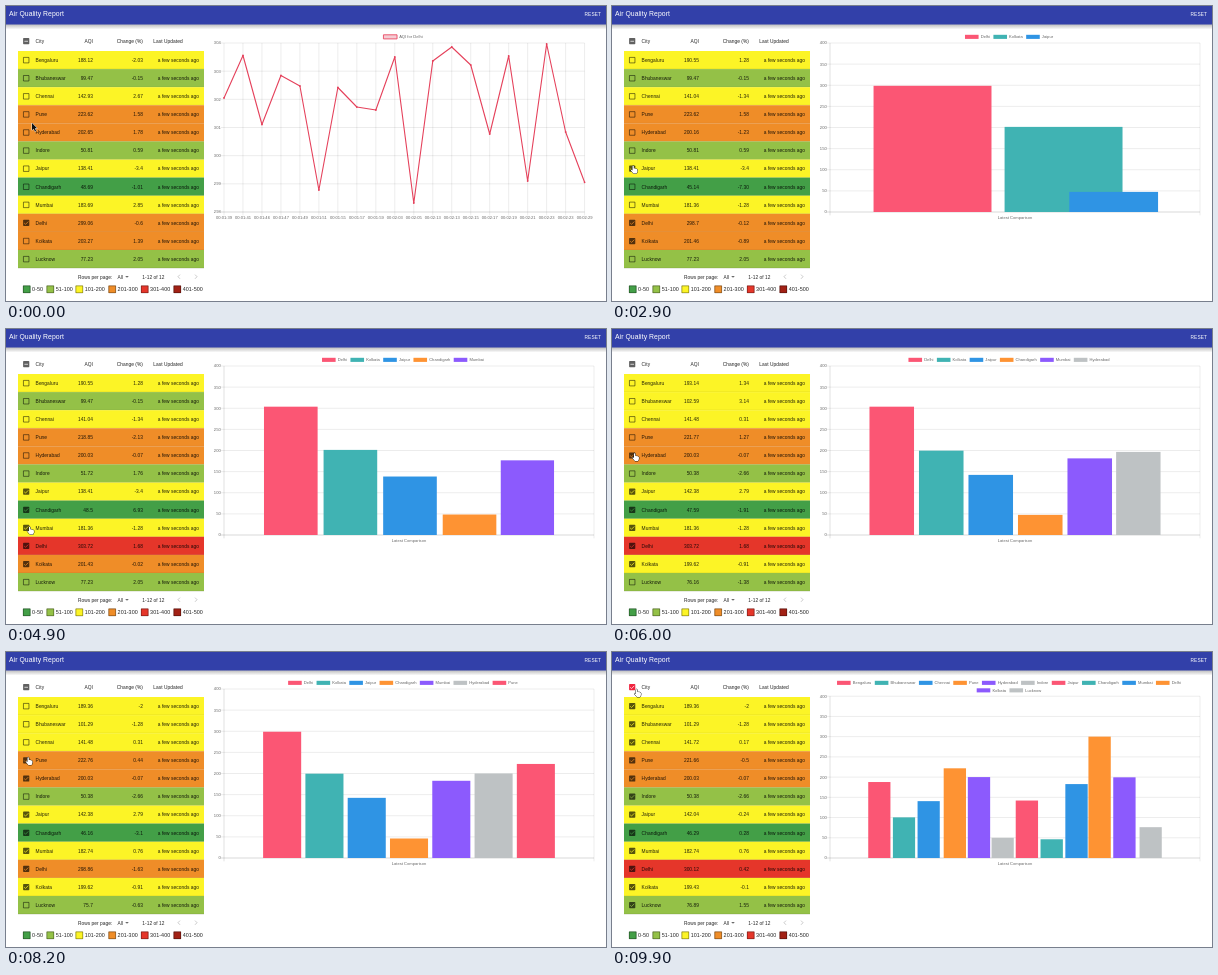
Write an HTML page with a canvas that moves like this. It is 600x295 px and loops after 10000 ms.

```html
<!DOCTYPE html>
<html lang="en">
<head>
<meta charset="utf-8">
<title>Air Quality Report</title>
<style>
html, body { margin: 0; width: 100%; height: 100%; overflow: hidden; background: #fff; }
canvas { display: block; width: 600px; height: 295px; }
</style>
</head>
<body>
<canvas id="stage"></canvas>
<script>
const W = 600, H = 295, LOOP = 10000, STEP = 100;
const canvas = document.getElementById('stage');
const ctx = canvas.getContext('2d');
const dpr = window.devicePixelRatio || 1;
canvas.width = W * dpr;
canvas.height = H * dpr;

const FONT = '"Liberation Sans", Arial, sans-serif';
const INK = 'rgba(0,0,0,0.87)';
const BANDS = [
  ['0-50', '#439f47', 17], ['51-100', '#94c147', 40.6], ['101-200', '#fcf426', 69.6],
  ['201-300', '#ef8d28', 102.5], ['301-400', '#e5362a', 135], ['401-500', '#a22115', 167.6]
];
const PALETTE = ['#fb5674', '#40b3b3', '#2f94e4', '#fe9333', '#8c5afd', '#bec2c4'];
const CITIES = ['Bengaluru', 'Bhubaneswar', 'Chennai', 'Pune', 'Hyderabad', 'Indore',
  'Jaipur', 'Chandigarh', 'Mumbai', 'Delhi', 'Kolkata', 'Lucknow'];

// Readings pushed by the feed: city -> [aqi, change %]
const FEED = [
  { at: 0, set: { Bengaluru: [188.12, -2.03], Bhubaneswar: [99.47, -0.15], Chennai: [142.93, 2.67],
    Pune: [223.62, 1.58], Hyderabad: [202.65, 1.78], Indore: [50.81, 0.59], Jaipur: [138.41, -3.4],
    Chandigarh: [48.69, -1.01], Mumbai: [183.69, 2.85], Delhi: [299.06, -0.6],
    Kolkata: [203.27, 1.39], Lucknow: [77.23, 2.05] } },
  { at: 1400, set: { Bengaluru: [190.55, 1.28], Chennai: [141.04, -1.34], Hyderabad: [200.16, -1.23],
    Chandigarh: [45.14, '-7.30'], Mumbai: [181.36, -1.28], Delhi: [298.7, -0.12], Kolkata: [201.46, -0.89] } },
  { at: 3400, set: { Pune: [218.85, -2.13], Hyderabad: [200.03, -0.07], Indore: [51.72, 1.76],
    Chandigarh: [48.5, 6.93], Delhi: [303.72, 1.68], Kolkata: [201.43, -0.02] } },
  { at: 5400, set: { Bengaluru: [193.14, 1.34], Bhubaneswar: [102.59, 3.14], Chennai: [141.48, 0.31],
    Pune: [221.77, 1.27], Indore: [50.38, -2.66], Jaipur: [142.38, 2.79], Chandigarh: [47.59, -1.91],
    Kolkata: [199.62, -0.91], Lucknow: [76.16, -1.38] } },
  { at: 7400, set: { Bengaluru: [189.36, -2], Bhubaneswar: [101.29, -1.28], Pune: [222.76, 0.44],
    Chandigarh: [46.16, -3.1], Mumbai: [182.74, 0.76], Delhi: [298.86, -1.63], Lucknow: [75.7, -0.63] } },
  { at: 9400, set: { Chennai: [141.72, 0.17], Pune: [221.66, -0.5], Jaipur: [142.04, -0.24],
    Chandigarh: [46.29, 0.28], Delhi: [300.12, 0.42], Kolkata: [199.43, -0.1], Lucknow: [76.89, 1.55] } }
];

const BAR_START = 900, ALL_AT = 9000;
const CLICKS = [['Delhi', 0], ['Kolkata', BAR_START], ['Jaipur', 2800], ['Chandigarh', 3700],
  ['Mumbai', 4300], ['Hyderabad', 5300], ['Pune', 7200]];

const POINTER = [[0, 26, 117], [750, 19.5, 232], [1050, 19.5, 232], [1700, 307, 87], [2000, 307, 87],
  [2650, 19.5, 159.5], [3000, 19.5, 159.5], [3500, 20.5, 177.5], [3850, 20.5, 177.5], [4200, 22, 197.5],
  [4950, 22, 197.5], [5250, 21, 124], [6700, 21, 124], [7100, 20.5, 105], [8300, 20.5, 105],
  [8850, 23, 37], [10000, 23, 37]];

const LINE_Y = [92, 49.5, 118.5, 69.5, 80, 184, 81.5, 101, 104, 51, 197, 55, 41, 59, 128, 50, 175, 38, 126, 176.3];
const TIMES = '1:39 1:41 1:46 1:47 1:49 1:51 1:55 1:57 1:59 2:03 2:05 2:13 2:13 2:15 2:17 2:19 2:21 2:23 2:23 2:29'.split(' ');

const LEFT = 218, RIGHT = 588, BASE = 206, TOP = 37, LEGEND_MID = 398.7;
const ROW_TOP = 45, ROW_H = 18.09;

function text(str, x, y, size, color = INK, align = 'left', gap = 0.05) {
  ctx.font = size + 'px ' + FONT;
  ctx.letterSpacing = gap + 'px';
  ctx.textAlign = align;
  ctx.textBaseline = 'alphabetic';
  ctx.fillStyle = color;
  ctx.fillText(str, x, y + size * 0.36);
}

function box(x, y, w, h, color) {
  ctx.fillStyle = color;
  ctx.fillRect(x, y, w, h);
}

function path(points, color, width) {
  ctx.beginPath();
  points.forEach(([x, y]) => ctx.lineTo(x, y));
  ctx.strokeStyle = color;
  ctx.lineWidth = width;
  ctx.stroke();
}

const hair = (x1, y1, x2, y2, alpha = 0.13) => path([[x1, y1], [x2, y2]], `rgba(0,0,0,${alpha})`, 0.6);

function readings(t) {
  return Object.assign({}, ...FEED.filter(f => f.at <= t).map(f => f.set));
}

function selected(t) {
  return t >= ALL_AT ? CITIES : CLICKS.filter(c => c[1] <= t).map(c => c[0]);
}

function band(aqi) {
  return BANDS[Math.min(5, aqi <= 50 ? 0 : aqi <= 100 ? 1 : Math.ceil(aqi / 100))][1];
}

function checkbox(x, y, state, ink, back) {
  const r = 3.1;
  if (state === 'off') {
    ctx.strokeStyle = ink;
    ctx.lineWidth = 0.75;
    ctx.strokeRect(x - r + 0.35, y - r + 0.35, 2 * r - 0.7, 2 * r - 0.7);
    return;
  }
  ctx.fillStyle = ink;
  ctx.beginPath();
  ctx.roundRect(x - r, y - r, 2 * r, 2 * r, 0.7);
  ctx.fill();
  if (state === 'some') box(x - 1.8, y - 0.35, 3.6, 0.7, back);
  else path([[x - 2, y + 0.1], [x - 0.7, y + 1.4], [x + 2.1, y - 1.4]], back, 0.75);
}

function drawHeader() {
  const shade = ctx.createLinearGradient(0, 18, 0, 23.5);
  shade.addColorStop(0, 'rgba(0,0,0,0.28)');
  shade.addColorStop(1, 'rgba(0,0,0,0)');
  box(0, 18, W, 5.5, shade);
  box(0, 0, W, 18.5, '#3240a9');
  text('Air Quality Report', 3, 7.5, 6.85, '#fff');
  text('RESET', 578.5, 7.9, 4.8, '#fff', 'left', 0.13);
}

function drawTable(t) {
  const data = readings(t), chosen = selected(t), size = 4.85;
  const all = t >= ALL_AT;
  checkbox(20.2, 35.2, all ? 'on' : 'some', all ? '#f0243f' : 'rgba(0,0,0,0.62)', '#fff');
  text('City', 29.6, 35.6, size);
  text('AQI', 87, 35.6, size, INK, 'right');
  text('Change (%)', 137, 35.6, size, INK, 'right');
  text('Last Updated', 147.3, 35.6, size);

  CITIES.forEach((city, i) => {
    const [aqi, change] = data[city];
    const top = ROW_TOP + i * ROW_H, mid = top + ROW_H / 2;
    const color = band(aqi);
    box(12, top, 186, ROW_H, color);
    hair(12, top + ROW_H, 198, top + ROW_H, 0.16);
    checkbox(20.2, mid + 0.1, chosen.includes(city) ? 'on' : 'off', 'rgba(0,0,0,0.66)', color);
    text(city, 29.6, mid + 0.1, size);
    text(aqi, 87, mid + 0.1, size, INK, 'right');
    text(change, 137, mid + 0.1, size, INK, 'right');
    text('a few seconds ago', 193, mid + 0.1, size, INK, 'right');
  });

  text('Rows per page:', 72, 270.8, 4.8);
  text('All', 111.5, 270.8, 4.8);
  text('1-12 of 12', 136.3, 270.8, 4.8);
  ctx.beginPath();
  ctx.moveTo(119.2, 270);
  ctx.lineTo(122.8, 270);
  ctx.lineTo(121, 271.8);
  ctx.fillStyle = 'rgba(0,0,0,0.6)';
  ctx.fill();
  path([[174, 268.6], [172, 270.7], [174, 272.8]], 'rgba(0,0,0,0.3)', 0.7);
  path([[189, 268.6], [191, 270.7], [189, 272.8]], 'rgba(0,0,0,0.3)', 0.7);

  BANDS.forEach(([label, color, x]) => {
    box(x, 279.6, 7.4, 7.4, color);
    ctx.strokeStyle = 'rgba(0,0,0,0.7)';
    ctx.lineWidth = 0.5;
    ctx.strokeRect(x + 0.25, 279.85, 6.9, 6.9);
    text(label, x + 9.1, 283.3, 5.4);
  });
}

// Lays out legend rows, centred; returns the number of rows
function drawLegend(items) {
  ctx.font = '4.1px ' + FONT;
  ctx.letterSpacing = '0px';
  const rows = [[]], widths = [0];
  items.forEach(item => {
    const w = 19.1 + ctx.measureText(item.label).width;
    if (widths[widths.length - 1] + w > 372) { rows.push([]); widths.push(0); }
    rows[rows.length - 1].push({ ...item, w });
    widths[widths.length - 1] += w;
  });
  rows.forEach((row, r) => {
    let x = LEGEND_MID - widths[r] / 2;
    const y = 30.9 + r * 7.5;
    row.forEach(({ label, color, border, w }) => {
      box(x, y - 2.1, 13.6, 4.1, color);
      if (border) {
        ctx.strokeStyle = border;
        ctx.lineWidth = 0.9;
        ctx.strokeRect(x, y - 2.1, 13.6, 4.1);
      }
      text(label, x + 15.7, y, 4.1, '#666', 'left', 0);
      x += w;
    });
  });
  return rows.length;
}

function yAxis(top, right, from, to, step) {
  const n = (to - from) / step;
  for (let i = 0; i <= n; i++) {
    const y = BASE - (BASE - top) * i / n;
    hair(LEFT - 3.4, y, right, y, i === 0 ? 0.25 : 0.13);
    text(from + i * step, LEFT - 3.3, y, 4.1, '#666', 'right', 0);
  }
}

function drawLine() {
  const right = 578.6, dx = (right - LEFT) / (LINE_Y.length - 1);
  drawLegend([{ label: 'AQI for Delhi', color: '#f4ccd3', border: '#ea4964' }]);
  yAxis(TOP, right, 298, 304, 1);
  const pts = LINE_Y.map((y, i) => [LEFT + i * dx, y]);
  pts.forEach(([x], i) => {
    hair(x, TOP, x, BASE + 3.4);
    text('00:0' + TIMES[i], x, 212, 4.1, '#666', 'center', 0);
  });
  ctx.lineJoin = 'round';
  path(pts, '#e5415b', 1.1);
  pts.forEach(([x, y]) => {
    ctx.beginPath();
    ctx.arc(x, y, 0.9, 0, Math.PI * 2);
    ctx.fillStyle = '#e5415b';
    ctx.fill();
  });
}

const CHANGES = [...new Set([...CLICKS.map(c => c[1]), ...FEED.map(f => f.at), ALL_AT])]
  .filter(at => at >= BAR_START).sort((a, b) => a - b);

// Bars in pixels at time t, after the first k+1 chart changes
function barsAt(t, k) {
  const at = CHANGES[k], data = readings(at), list = selected(at);
  const old = k > 0 ? barsAt(at, k - 1) : {};
  const p = 1 - Math.pow(1 - Math.min(1, (t - at) / 1000), 4);
  const slot = (RIGHT - LEFT) * 0.8 / list.length;
  const bars = {};
  list.forEach((city, i) => {
    const goal = { x: LEFT + (RIGHT - LEFT) * 0.1 + slot * (i + 0.05), w: slot * 0.9, v: data[city][0] };
    const from = old[city] || { ...goal, v: 0 };
    const mix = key => from[key] + (goal[key] - from[key]) * p;
    bars[city] = { x: mix('x'), w: mix('w'), v: mix('v') };
  });
  return bars;
}

function drawBars(t) {
  const list = selected(t);
  const color = i => PALETTE[i % PALETTE.length];
  const rows = drawLegend(list.map((label, i) => ({ label, color: color(i) })));
  const top = TOP + (rows - 1) * 7.2;
  yAxis(top, RIGHT, 0, 400, 50);
  hair(LEFT, top, LEFT, BASE + 3.4, 0.2);
  hair(RIGHT, top, RIGHT, BASE + 3.4);
  text('Latest Comparison', (LEFT + RIGHT) / 2, 212, 4.1, '#666', 'center', 0);
  const bars = barsAt(t, CHANGES.filter(at => at <= t).length - 1);
  list.forEach((city, i) => {
    const { x, w, v } = bars[city];
    const h = (BASE - top) * v / 400;
    box(x, BASE - h, w, h, color(i));
  });
}

const ARROW = new Path2D('M0 0V7.2L1.7 5.7L2.9 8.4L4.1 7.9L2.9 5.3H5.1Z');
const HAND = new Path2D('M1 .6Q1.7-.2 2.3.6V3Q3.2 2.5 3.6 3.2Q4.4 2.8 4.8 3.5Q5.8 3.3 5.9 4.3V6L5.1 8H1.9L-.6 5Q-.5 4 .4 4.4L1 5Z');

function drawPointer(t) {
  const i = POINTER.findIndex(p => p[0] > t);
  const [t0, x0, y0] = POINTER[i - 1], [t1, x1, y1] = POINTER[i];
  const u = (t - t0) / (t1 - t0), e = u * u * (3 - 2 * u);
  const x = x0 + (x1 - x0) * e, y = y0 + (y1 - y0) * e;
  const hand = x < 25;
  ctx.save();
  ctx.translate(x, y);
  ctx.lineJoin = 'round';
  ctx.lineWidth = 0.9;
  ctx.strokeStyle = hand ? '#111' : '#fff';
  ctx.fillStyle = hand ? '#fff' : '#111';
  const shape = hand ? HAND : ARROW;
  ctx.stroke(shape);
  ctx.fill(shape);
  ctx.restore();
}

function draw(t) {
  ctx.setTransform(dpr, 0, 0, dpr, 0, 0);
  box(0, 0, W, H, '#fff');
  drawHeader();
  drawTable(t);
  if (t < BAR_START) drawLine();
  else drawBars(t);
  drawPointer(t);
}

const start = performance.now();
function tick() {
  const t = (performance.now() - start) % LOOP;
  draw(Math.floor(t / STEP) * STEP);
  requestAnimationFrame(tick);
}
tick();
</script>
</body>
</html>
```
